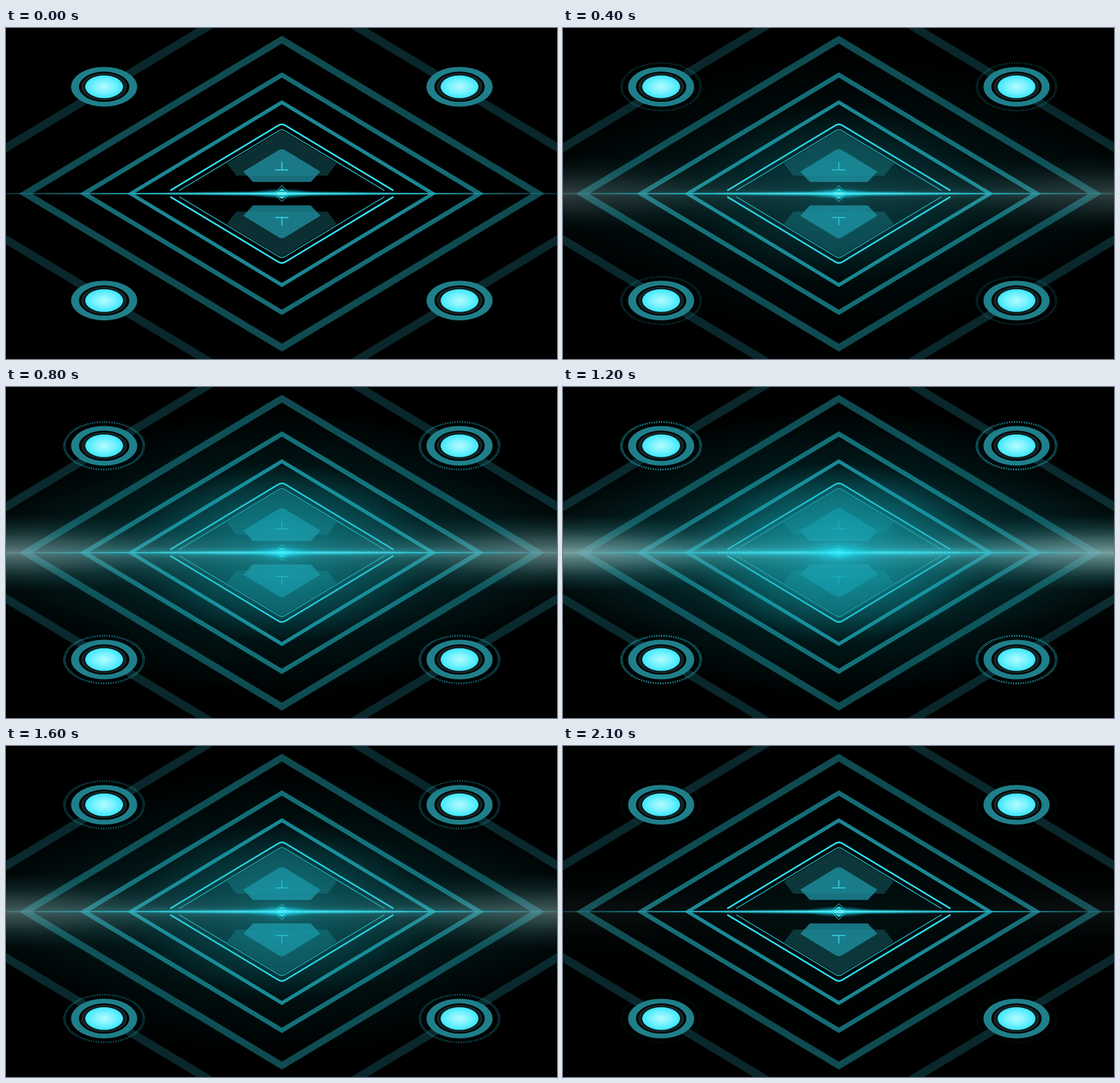
An HTML page that plays this animation: 800x480 px, repeating every 2.2 s.

```html
<!DOCTYPE html>
<html>
<head>
<meta charset="utf-8">
<style>
  html, body { margin: 0; width: 100%; height: 100%; overflow: hidden; background: #000; }
  svg { display: block; width: 800px; height: 480px; }
</style>
</head>
<body>
<svg viewBox="-400.5 -240.2 800 480">
  <defs>
    <radialGradient id="lamp">
      <stop offset="0" stop-color="#b4fbff"/>
      <stop offset=".5" stop-color="#7df3ff"/>
      <stop offset="1" stop-color="#3ce6fa"/>
    </radialGradient>
    <radialGradient id="socket">
      <stop offset=".78" stop-color="#0a1416"/>
      <stop offset=".86" stop-color="#1d2b2d"/>
      <stop offset=".92" stop-color="#0a1214"/>
      <stop offset=".94" stop-color="#000"/>
    </radialGradient>
    <radialGradient id="flare">
      <stop offset="0" stop-color="#2cecff"/>
      <stop offset=".4" stop-color="#1cd0e4" stop-opacity=".7"/>
      <stop offset="1" stop-color="#18b0c4" stop-opacity="0"/>
    </radialGradient>
    <radialGradient id="haze">
      <stop offset="0" stop-color="#0b98a2" stop-opacity=".72"/>
      <stop offset=".3" stop-color="#0b98a2" stop-opacity=".44"/>
      <stop offset=".6" stop-color="#0b98a2" stop-opacity=".17"/>
      <stop offset="1" stop-color="#0b98a2" stop-opacity="0"/>
    </radialGradient>
    <radialGradient id="core">
      <stop offset="0" stop-color="#14cbde" stop-opacity=".75"/>
      <stop offset=".5" stop-color="#14b8c8" stop-opacity=".34"/>
      <stop offset="1" stop-color="#14b8c8" stop-opacity="0"/>
    </radialGradient>
    <radialGradient id="edge">
      <stop offset="0" stop-color="#a8b8b8" stop-opacity=".65"/>
      <stop offset=".4" stop-color="#86a8a8" stop-opacity=".38"/>
      <stop offset=".7" stop-color="#4f9090" stop-opacity=".15"/>
      <stop offset="1" stop-color="#2f8080" stop-opacity="0"/>
    </radialGradient>
    <linearGradient id="band" x2="0" y2="1">
      <stop offset="0" stop-color="#1c8f98" stop-opacity="0"/>
      <stop offset=".25" stop-color="#1c8f98" stop-opacity=".09"/>
      <stop offset=".38" stop-color="#279ba3" stop-opacity=".26"/>
      <stop offset=".46" stop-color="#3cb4bc" stop-opacity=".5"/>
      <stop offset=".5" stop-color="#54ccd4" stop-opacity=".72"/>
      <stop offset=".54" stop-color="#3cb4bc" stop-opacity=".5"/>
      <stop offset=".62" stop-color="#279ba3" stop-opacity=".26"/>
      <stop offset=".75" stop-color="#1c8f98" stop-opacity=".09"/>
      <stop offset="1" stop-color="#1c8f98" stop-opacity="0"/>
    </linearGradient>
    <linearGradient id="beam" gradientUnits="userSpaceOnUse" x1="-400" x2="400">
      <stop offset="0" stop-color="#1a7480" stop-opacity=".4"/>
      <stop offset=".25" stop-color="#25b8c8"/>
      <stop offset=".5" stop-color="#5ff6ff"/>
      <stop offset=".75" stop-color="#25b8c8"/>
      <stop offset="1" stop-color="#1a7480" stop-opacity=".4"/>
    </linearGradient>

    <g id="half">
      <path d="M0-92L80-44 66-26H-66L-80-44z" fill="#0b2f32"/>
      <path d="M-5-63Q0-66 5-63L56-32 42-17H-42L-56-32z" fill="#2090a0" opacity=".77"/>
      <path d="M-9.500-34.500H9.500M0-35V-46" fill="none" stroke="#32d8ea" stroke-width="1.5"/>
      <path d="M-162-4.500L-5-99Q0-102 5-99L162-4.500" fill="none" stroke="#30e4f8" stroke-width="2.4"/>
      <path d="M-149-4.500L-4-91.500Q0-94 4-91.500L149-4.500" fill="none" stroke="#2accde" stroke-width="1.1"/>
      <path d="M-11.500 0L0-11.500 11.500 0" fill="none" stroke="#2fd4e4"/>
      <path d="M-6-3.500L0-8 6-3.500z" fill="#2fd4e4"/>
    </g>
    <g id="button">
      <circle r="48" fill="#1f7f8a"/>
      <circle r="36.500" fill="url(#socket)"/>
      <circle r="27.500" fill="url(#lamp)"/>
    </g>
    <circle id="ticks" r="57.500" fill="none" stroke="#22b4c6" stroke-width="4"
      pathLength="200" stroke-dasharray=".8 1.2"/>
  </defs>

  <g id="frames" fill-rule="evenodd"></g>
  <use href="#half"/>
  <use href="#half" transform="scale(1 -1)"/>
  <ellipse rx="210" ry="4" fill="url(#flare)"/>
  <ellipse rx="50" ry="8" fill="url(#flare)" opacity=".8"/>
  <rect x="-401" y="-1" width="802" height="2" fill="url(#beam)"/>
  <path d="M-165 0H165" stroke="#2cc4d4" stroke-width="4" stroke-dasharray="1 2" opacity=".3"/>
  <path d="M-7-1.500H7M-7 1.500H7" stroke="#8ffaff"/>

  <g id="glow">
    <ellipse rx="420" ry="215" fill="url(#haze)"/>
    <ellipse rx="215" ry="130" fill="url(#core)"/>
    <path d="M-164 0L0-99 164 0 0 99z" fill="#128a98" opacity=".34"/>
    <rect x="-401" y="-110" width="802" height="220" fill="url(#band)"/>
    <ellipse cx="-400" rx="340" ry="54" fill="url(#edge)"/>
    <ellipse cx="400" rx="340" ry="54" fill="url(#edge)"/>
    <ellipse rx="400" ry="9" fill="url(#flare)" opacity=".6"/>
    <ellipse rx="60" ry="20" fill="url(#flare)"/>
    <path d="M-175 0H175" stroke="#8ff" stroke-width="4" stroke-dasharray="1.500 2.500" opacity=".4"/>
    <g id="rings"></g>
  </g>
  <g id="buttons"></g>
</svg>
<script>
  const $ = id => document.getElementById(id);
  const diamond = (w, h) => `M${-w} 0L0 ${-h} ${w} 0 0 ${h}z`;

  // outer half-width and half-height, inner half-width and half-height, colour
  $('frames').innerHTML = [
    [523, 314, 500, 300, '#0a272b'],
    [381.5, 229, 362.5, 217.6, '#0f4b51'],
    [293.5, 176, 280.5, 168.3, '#156b74'],
    [224.5, 135.5, 214.5, 129.500, '#1b8794']
  ].map(([w, h, iw, ih, c]) => `<path d="${diamond(w, h)}${diamond(iw, ih)}" fill="${c}"/>`).join('');

  const corners = id => [-258, 258].flatMap(x => [-155, 155].map(y =>
    `<use href="#${id}" transform="translate(${x} ${y}) scale(1 .6)"/>`)).join('');
  $('buttons').innerHTML = corners('button');
  $('rings').innerHTML = corners('ticks');

  // The glow rises and falls in even steps of 100 ms.
  const start = performance.now();
  function draw() {
    const step = Math.floor((performance.now() - start) / 100) % 22;
    $('glow').style.opacity = 1 - Math.abs(step - 11) / 11;
    requestAnimationFrame(draw);
  }
  draw();
</script>
</body>
</html>
```
